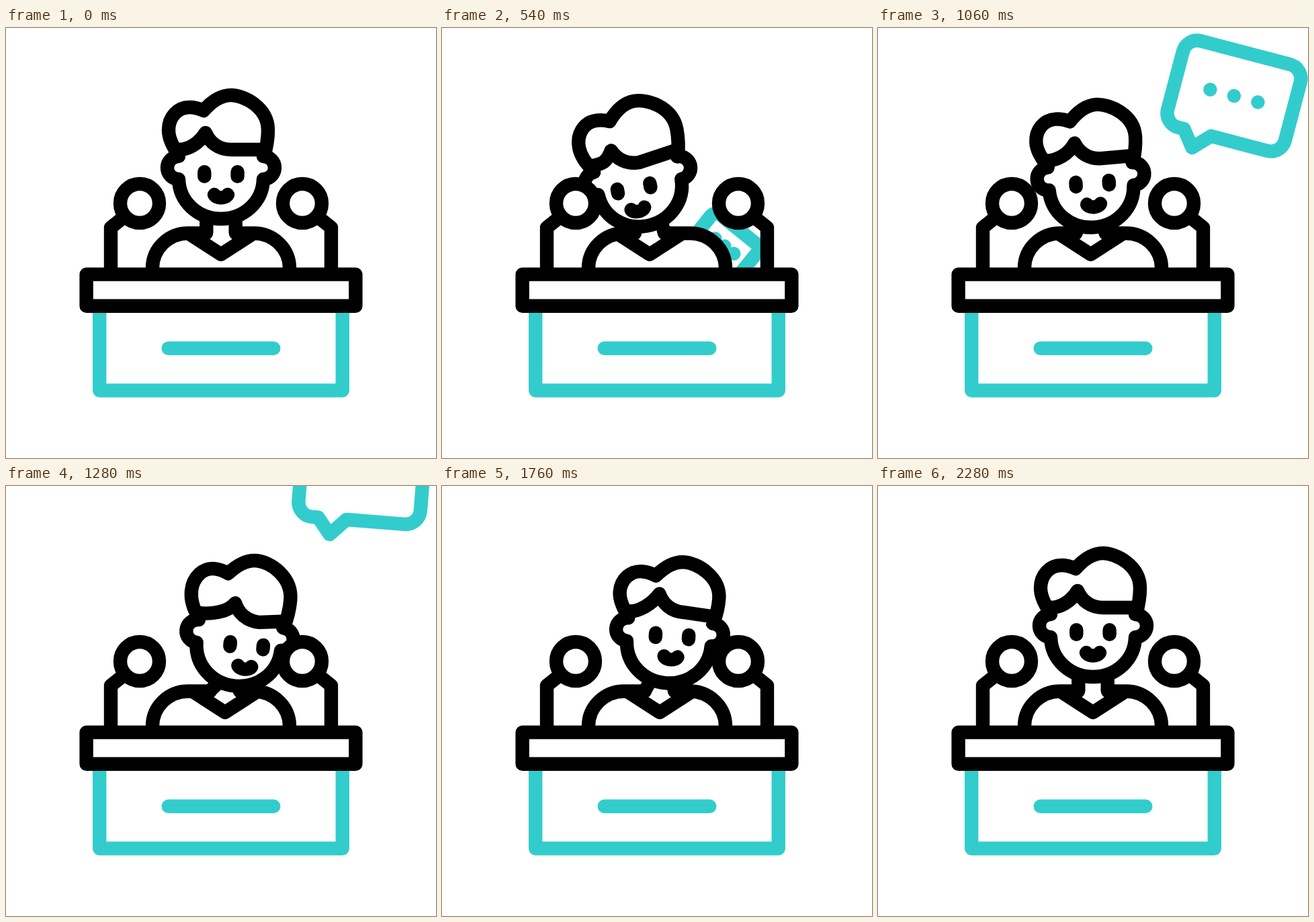
An HTML page with a canvas that plays this animation: 640 px wide and 640 px high, repeating every 2400 ms.

```html
<!DOCTYPE html>
<html lang="en">
<head>
<meta charset="utf-8">
<title>Speaker at a podium</title>
<style>
html, body { margin: 0; width: 100%; height: 100%; overflow: hidden; background: #fff; }
canvas { display: block; }
</style>
</head>
<body>
<canvas id="stage" width="640" height="640"></canvas>
<script>
const ctx = document.getElementById('stage').getContext('2d');
const LOOP = 2400, TEAL = '#33cccc', BLACK = '#000', WHITE = '#fff';
const RAD = Math.PI / 180;

// Eased 0 to 1 between two times.
function ramp(t, from, to) {
  const u = Math.min(1, Math.max(0, (t - from) / (to - from)));
  return u * u * (3 - 2 * u);
}

function poseAt(t) {
  const cross = ramp(t, 880, 1270);
  const left = ramp(t, 0, 480) - cross;
  const right = cross - ramp(t, 1590, 2040);
  const lean = (l, r) => l * left + r * right;
  const nod = 10 * ramp(t, 0, 500) - 13.5 * ramp(t, 500, 860) + 9.8 * ramp(t, 860, 1270)
    - 12.3 * ramp(t, 1270, 1960) + 6 * ramp(t, 1960, 2280);
  const turn = lean(-10.7, 5.5) * RAD;
  const cos = Math.cos(turn), sin = Math.sin(turn);
  const look = lean(-2.5, 8) + 0.5 * nod * (right - left);
  return {
    x: lean(-28.8, 28), y: lean(11.8, 14), turn, cos, sin,
    collar: lean(-11, 6),
    // Face shift along the tilted axes; the crown moves against the nod.
    faceX: look * cos + nod * sin,
    faceY: nod * cos - look * sin,
    crown: 5 * left - 0.75 * nod
  };
}

function shape(d, color = BLACK, fill) {
  const path = new Path2D(d);
  if (fill) {
    ctx.fillStyle = fill;
    ctx.fill(path);
  }
  ctx.strokeStyle = color;
  ctx.stroke(path);
}

// The bubble is tossed up along an arc, growing and straightening on the way.
function drawCard(t) {
  if (t < 400 || t > 1500) return;
  const s = t - 540;
  const k = 1 - Math.max(0, (1130 - t) / 820) ** 2;
  const w = 91 * k, h = 67 * k, r = 22 * k;
  ctx.save();
  ctx.translate(420 + 0.36 * s - 0.000286 * s * s, 325 - 0.36 * s - 0.000134 * s * s);
  ctx.rotate((39 - 0.0465 * s) * RAD);
  shape(`M${r - w},${-h} H${w - r} A${r},${r} 0 0 1 ${w},${r - h} V${h - r}
    A${r},${r} 0 0 1 ${w - r},${h} H${-18 * k} L${-41 * k},${91 * k} L${-60 * k},${h} H${r - w}
    A${r},${r} 0 0 1 ${-w},${h - r} V${r - h} A${r},${r} 0 0 1 ${r - w},${-h}Z`, TEAL, WHITE);
  for (const i of [-1, 0, 1]) shape(`M${37 * k * i},0 h0.01`, TEAL);
  ctx.restore();
}

function drawBody(pose) {
  const c = pose.collar;
  shape('M218,362 V357 A53,52 0 0 1 271,305 H369 A53,52 0 0 1 422,357 V362Z', 'transparent', WHITE);
  shape(`M218,362 V357 A53,52 0 0 1 271,305.5 H${298 + c}`);
  shape(`M422,362 V357 A53,52 0 0 0 369,305.5 H${342 + c}`);
  shape(`M${272 + c},306 L${320 + c},337 L${368 + c},306`);
  for (const side of [-21.7, 21.7]) {
    const x = 320 + pose.x + side * pose.cos - 70 * pose.sin;
    const y = 208 + pose.y + side * pose.sin + 70 * pose.cos;
    shape(`M${x},${y} L${320 + side + c},304`);
  }
}

function drawHead(pose) {
  const at = (x, y) => `${x + pose.faceX},${y + pose.faceY}`;
  const top = (x, y, k = 1) => `${x},${y + pose.crown * k}`;

  ctx.save();
  ctx.translate(320 + pose.x, 208 + pose.y);
  ctx.rotate(pose.turn);
  ctx.translate(-320, -208);

  // Ears and chin
  shape(`M257,191 A17,17 0 0 0 257,225 C258,259 286,284 320,284
    C354,284 382,259 383,225 A17,17 0 0 0 383,191`, BLACK, WHITE);

  // Hair and fringe
  shape(`M257,190 C250,178 242,166 ${top(242, 152, 0.5)}
    C${top(242, 132, 0.8)} ${top(256, 118)} ${top(273, 118)}
    Q${top(283, 118)} ${top(294, 123)}
    C${top(308, 107)} ${top(322, 100)} ${top(335, 100)}
    C${top(354, 100)} ${top(390, 118)} ${top(390, 152, 0.5)}
    Q390,170 384,191`, BLACK, WHITE);
  shape(`M257,181 C272,181 ${at(287, 172)} ${at(297, 156)}
    C${at(303, 170)} ${at(316, 181)} ${at(335, 181)} L386,181`);

  // Eyes and mouth
  for (const x of [295.3, 344.6]) shape(`M${at(x, 214.3)} L${at(x, 220.7)}`);
  shape(`M${at(310, 248)} C${at(313, 254)} ${at(327, 254)} ${at(330, 248)}`);
  ctx.restore();
}

function drawMic(flip) {
  ctx.save();
  if (flip) {
    ctx.translate(640, 0);
    ctx.scale(-1, 1);
  }
  shape('M156,362 V297 L176,281');
  shape('M228,261 a29,29 0 1 1 -58,0 a29,29 0 1 1 58,0Z', BLACK, WHITE);
  ctx.restore();
}

function drawPodium() {
  shape('M139.2,414 V539.5 H500.8 V414', TEAL, WHITE);
  shape('M241.7,476.7 H398.3', TEAL);
  shape('M119.6,366.6 H520.4 V413.8 H119.6Z', BLACK, WHITE);
}

function draw(now) {
  const t = now % LOOP;
  const pose = poseAt(t);
  ctx.fillStyle = WHITE;
  ctx.fillRect(0, 0, 640, 640);
  ctx.lineWidth = 20.4;
  ctx.lineCap = ctx.lineJoin = 'round';
  drawCard(t);
  drawBody(pose);
  drawHead(pose);
  drawMic(false);
  drawMic(true);
  drawPodium();
}

function tick() {
  draw(performance.now());
  requestAnimationFrame(tick);
}
tick();
</script>
</body>
</html>
```
